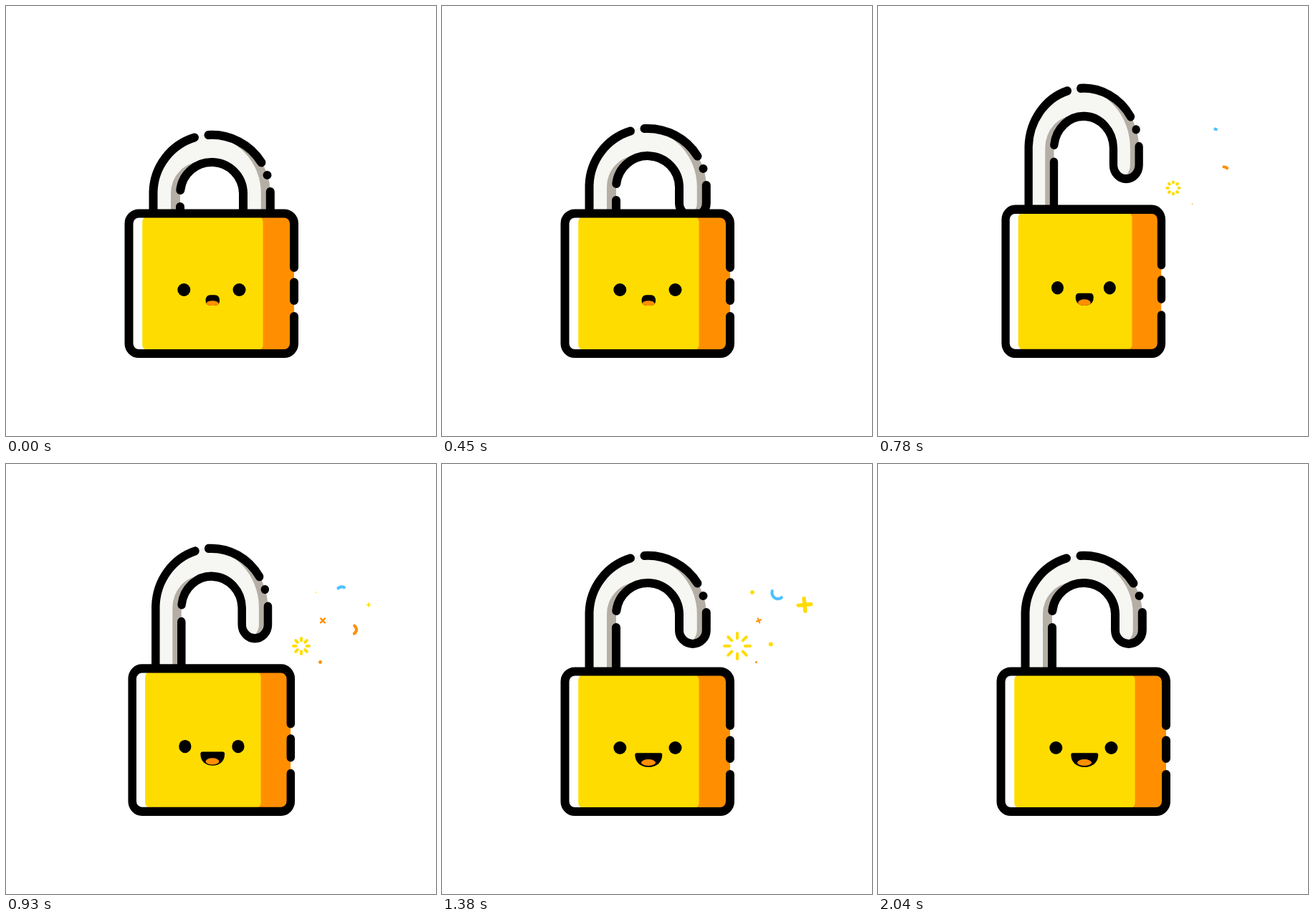
An HTML page with a canvas for the animation above (2070 ms loop, 600 by 600 pixels).

```html
<!DOCTYPE html>
<html lang="en">
<head>
<meta charset="utf-8">
<title>Padlock</title>
<style>
html, body { margin: 0; width: 100%; height: 100%; overflow: hidden; background: #fff; }
canvas { display: block; }
</style>
</head>
<body>
<canvas id="stage" width="600" height="600"></canvas>
<script>
const ctx = document.getElementById('stage').getContext('2d');
const LOOP = 2070, STEP = 30;
const YELLOW = '#ffdc00', ORANGE = '#ff8f00', BLUE = '#4fc0ff';
const INK = '#000', LIGHT = '#f6f6f2', SHADE = '#b4aea5';
let t = 0;

const mix = (a, b, u) => a + (b - a) * u;
const rad = degrees => degrees * Math.PI / 180;

// Progress of the current time through a span: even, eased, accelerating, up and down.
const phase = (start, end) => Math.min(1, Math.max(0, (t - start) / (end - start)));
const swing = (start, end) => (1 - Math.cos(Math.PI * phase(start, end))) / 2;
const speedUp = (start, end) => phase(start, end) ** 2;
const pulse = (start, end) => Math.max(0, Math.sin(Math.PI * phase(start, end)));

function fill(path, color) {
  ctx.fillStyle = color;
  ctx.fill(path);
}

function stroke(path, color, width) {
  if (width <= 0) return;
  ctx.strokeStyle = color;
  ctx.lineWidth = width;
  ctx.stroke(path);
}

function ellipse(x, y, rx, ry = rx) {
  const p = new Path2D();
  p.ellipse(x, y, rx, ry, 0, 0, 2 * Math.PI);
  return p;
}

function box(x, y, w, h, r) {
  const p = new Path2D();
  p.roundRect(x, y, w, h, r);
  return p;
}

function clipped(path, paint) {
  ctx.save();
  ctx.clip(path);
  paint();
  ctx.restore();
}

const shackle = new Path2D('M205.5 400V261A81.65 81.65 0 0 1 368.8 261V284A18.9 18.9 0 0 1 331 284V261A44 44 0 0 0 243 261V400Z');
const shackleLines = new Path2D(
  'M205.5 400V259A81.65 81.65 0 0 1 263 183.5' +
  'M282.5 180A81.65 81.65 0 0 1 356.5 218.5' +
  'M364.5 236h.01' +
  'M368.8 259V284A18.9 18.9 0 0 1 331 284V261A44 44 0 0 0 243.3 257' +
  'M243 280V400');
const caseShape = box(171.5, 289.5, 230.5, 195.5, 14);
const caseLines = new Path2D(
  'M402 365V303.5A14 14 0 0 0 388 289.5H185.5A14 14 0 0 0 171.5 303.5V471' +
  'A14 14 0 0 0 185.5 485H388A14 14 0 0 0 402 471V433M402 385.5V411');

function drawShackle() {
  const lift = 70 * phase(0, 840) ** 3.3 - 18 * swing(840, 960);
  ctx.save();
  ctx.translate(0, -lift);
  fill(shackle, SHADE);
  clipped(shackle, () => {
    ctx.translate(-13, 0);
    fill(shackle, LIGHT);
  });
  stroke(shackleLines, INK, 12);
  ctx.restore();
}

function drawCase() {
  fill(caseShape, '#fff');
  clipped(caseShape, () => {
    fill(box(340, 289, 62, 197, 0), ORANGE);
    fill(box(190.2, 294, 168.4, 186, 7), YELLOW);
  });
  stroke(caseLines, INK, 12);
}

function drawFace() {
  fill(ellipse(248.3, 396, 9), INK);
  fill(ellipse(325.5, 396, 9), INK);

  const open = swing(580, 1050);
  const grow = (a, b) => mix(a, b, open);
  const cx = 288.3, half = grow(9.7, 19), flat = grow(3, 16.5), curve = grow(6.5, 11);
  const top = 403.3, side = grow(411, 405.5), low = grow(418, 423);
  const mouth = new Path2D();
  mouth.moveTo(cx - half, side);
  mouth.quadraticCurveTo(cx - half, top, cx - flat, top);
  mouth.lineTo(cx + flat, top);
  mouth.quadraticCurveTo(cx + half, top, cx + half, side);
  mouth.bezierCurveTo(cx + half, 416.5, cx + curve, low, cx, low);
  mouth.bezierCurveTo(cx - curve, low, cx - half, 416.5, cx - half, side);
  fill(mouth, INK);
  clipped(mouth, () => fill(ellipse(288, grow(415.7, 416.6), grow(9, 10), 4.5), ORANGE));
}

function rays(x, y, count, from, to, turn) {
  const p = new Path2D();
  for (let i = 0; i < count; i++) {
    const a = turn + i * 2 * Math.PI / count, c = Math.cos(a), s = Math.sin(a);
    p.moveTo(x + c * from, y + s * from);
    p.lineTo(x + c * to, y + s * to);
  }
  return p;
}

function burst(x, y, start) {
  const head = mix(7.5, 18, speedUp(start, start + 570));
  const tail = mix(7.4, 18, speedUp(start + 450, start + 1030));
  ctx.globalAlpha = phase(start - 30, start + 90);
  stroke(rays(x, y, 8, tail, head, 0), YELLOW, 4 * (1 - phase(start + 1000, start + 1110)));
  ctx.globalAlpha = 1;
}

// An arc whose head runs ahead of its tail.
function curl(x, y, r, angle, sweep, color, start, span, delay) {
  const head = speedUp(start, start + span);
  const tail = speedUp(start + delay, start + delay + span * 0.8);
  if (tail === 1) return;
  const p = new Path2D();
  p.arc(x, y, r, rad(angle + sweep * tail), rad(angle + sweep * head), sweep < 0);
  stroke(p, color, 4.2 * phase(start, start + 60));
}

function sparkle(x, y, size, color, start, end, angle, spin) {
  const r = size * pulse(start, end);
  stroke(rays(x, y, 4, 0, r * 0.78, rad(angle + (t - start) * spin)), color, r * 0.48);
}

function dot(x, y, size, color, start, end) {
  fill(ellipse(x, y, size * pulse(start, end)), color);
}

function drawConfetti() {
  burst(412, 254, 600);
  curl(482.5, 231, 6.5, -90, 490, ORANGE, 600, 600, 200);
  curl(468.7, 179.8, 8.3, 292, -240, BLUE, 680, 500, 450);
  sparkle(442, 218.5, 8.5, ORANGE, 780, 1500, 8, 0.25);
  sparkle(506, 196.5, 12.3, YELLOW, 860, 1680, -13, 0.1875);
  dot(433, 179, 3.2, YELLOW, 860, 1660);
  dot(438.5, 276.5, 3.3, ORANGE, 720, 1500);
  dot(458.7, 251.4, 3, YELLOW, 1080, 1680);
}

function draw() {
  ctx.fillStyle = '#fff';
  ctx.fillRect(0, 0, 600, 600);
  ctx.lineCap = ctx.lineJoin = 'round';

  // The lock stretches, squashes and settles on its base.
  const stretch = 0.07 * swing(630, 840) - 0.095 * swing(840, 1080) + 0.025 * swing(1080, 1260);
  ctx.save();
  ctx.translate(286.8, 491);
  ctx.scale(1 - stretch, 1 + stretch / 2);
  ctx.translate(-286.8, -491);
  drawShackle();
  drawCase();
  drawFace();
  ctx.restore();

  drawConfetti();
}

function loop() {
  t = Math.floor(performance.now() % LOOP / STEP) * STEP;
  draw();
  requestAnimationFrame(loop);
}
loop();
</script>
</body>
</html>
```
